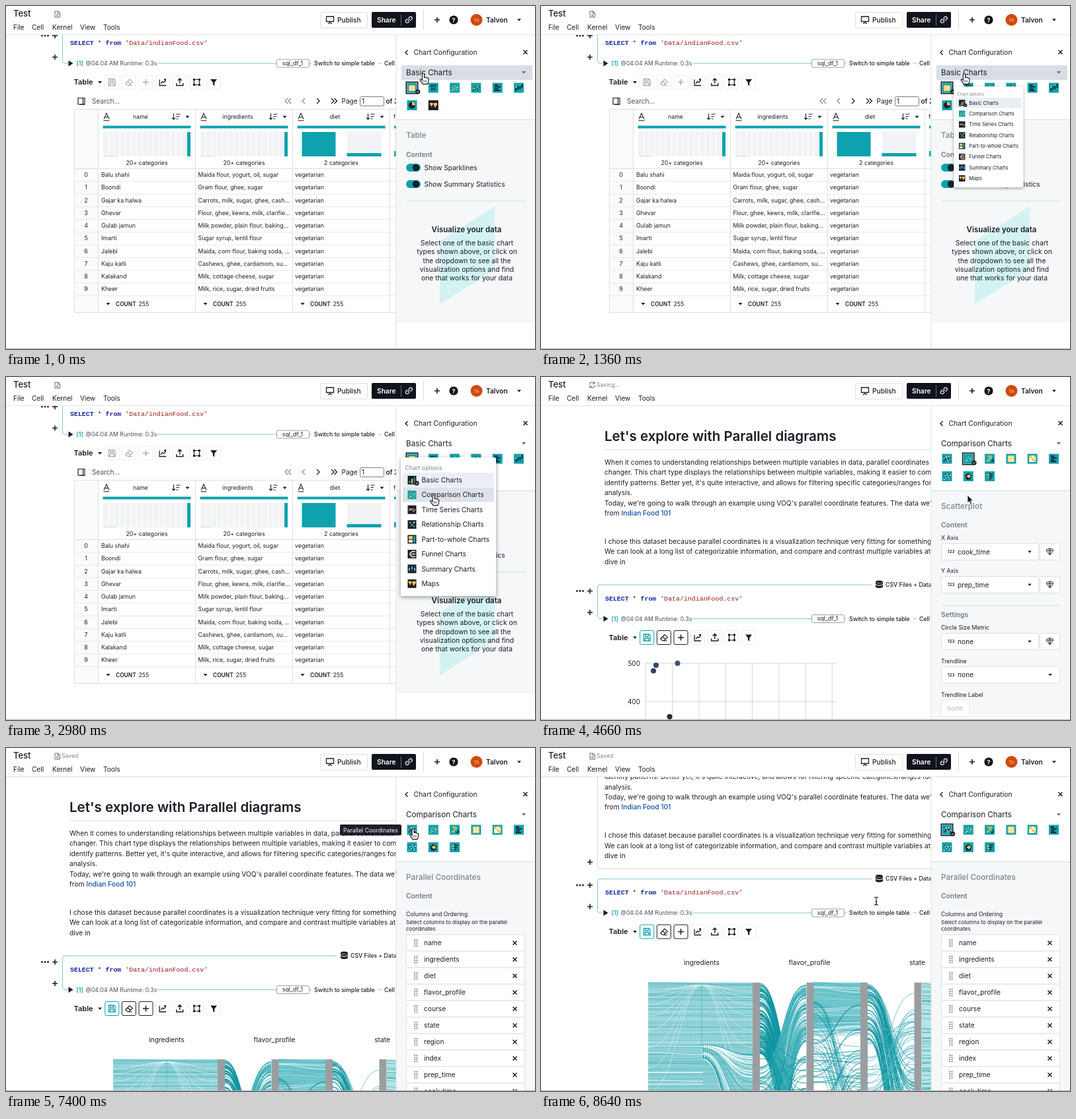
Animation, 800 px wide and 520 px high, one loop 8.66 s. Source, as an HTML page:

```html
<!DOCTYPE html>
<html lang="en">
<head>
<meta charset="utf-8">
<title>Notebook chart configuration</title>
<style>
html, body { margin: 0; width: 100%; height: 100%; overflow: hidden; background: #fff; }
svg { display: block; font-family: Inter, "Liberation Sans", sans-serif; }
.mono { font-family: "Liberation Mono", "DejaVu Sans Mono", monospace; }
</style>
</head>
<body>
<svg id="stage" width="800" height="520" viewBox="0 0 800 520"></svg>
<script>
const LOOP = 8660, TABLE_SCROLL = 279.5;
const INK = '#1b1e29', TEAL = '#0ea2ae', YELLOW = '#f8c54a', GREY = '#7d858d', LINE = '#dcdfe2';

// Markup helpers; text is placed by its vertical centre
const R = (x, y, w, h, fill, more = '') =>
  `<rect x="${x}" y="${y}" width="${w}" height="${h}" fill="${fill}" ${more}/>`;
const P = (d, stroke = INK, w = 1, fill = 'none', more = '') =>
  `<path d="${d}" stroke="${stroke}" stroke-width="${w}" fill="${fill}" ${more}/>`;
const F = (d, fill = INK) => P(d, 'none', 0, fill);
const C = (x, y, r, fill) => `<circle cx="${x}" cy="${y}" r="${r}" fill="${fill}"/>`;
const T = (x, cy, s, size = 8.8, weight = 400, fill = INK, more = '') =>
  `<text x="${x}" y="${(cy + size * .36).toFixed(2)}" font-size="${size}" font-weight="${weight}" fill="${fill}" ${more}>${s}</text>`;
const MID = 'text-anchor="middle"';
const G = (id, s, more = '') => `<g id="${id}" ${more}>${s}</g>`;
const at = (x, y, s) => `<g transform="translate(${x} ${y})">${s}</g>`;
const list = (n, fn) => Array.from({ length: n }, (_, i) => fn(i)).join('');
const box = (x, y, w, h, stroke = LINE, fill = '#fff') =>
  R(x + .5, y + .5, w - 1, h - 1, fill, `rx="2" stroke="${stroke}"`);
const caret = (x, y, s = 3, fill = INK) => F(`M${x - s} ${y - s / 2}h${2 * s}l${-s} ${s * 1.15}z`, fill);
const plus = (x, y, s = 4, col = INK) => P(`M${x - s} ${y}h${2 * s}M${x} ${y - s}v${2 * s}`, col, 1.6);
const cross = (x, y) => P(`M${x - 3} ${y - 3}l6 6m0-6l-6 6`, INK, 1.5);
const check = (x, y) => C(x, y, 3.6, INK) + P(`M${x - 1.6} ${y}l1.2 1.3 2-2.5`, '#fff', .9);

let seed = 7;
const rand = () => (seed = seed * 16807 % 2147483647) / 2147483647;

// Small chart icons, centred on 0,0
const dots = col => list(7, i => R(-5 + i * 1.5, 3.5 - (i * 5 % 8), 1.5, 1.5, col));
const glyphs = {
  table: R(-5, -4, 10, 9, YELLOW) + P('M-5-1h10M-5 2h10M-1.5-4v9M2-4v9', '#fff', .8),
  word: T(0, -2.5, 'WO', 5, 700, INK, MID) + T(0, 2.6, 'RD', 5, 700, INK, MID),
  scatter: dots(YELLOW) + R(-3, 2, 1.3, 1.3, '#fff') + R(3, -1, 1.3, 1.3, '#fff'),
  bubble: dots(INK) + C(2, -2, 1.3, YELLOW) + C(-3, 1, 1.2, YELLOW),
  bars: P('M-4.5-4h5M-4.5-1.3h9M-4.5 1.3h6M-4.5 4h8', INK, 1.8),
  candles: P('M-4 0v5M-1-2v5M2-4v6M5-6v6', INK, 1.8) + P('M-4-2v2M2-5v2', '#fff', .8),
  pie: C(0, 0, 5, INK) + F('M0 0V-5A5 5 0 0 1 5 0z', YELLOW),
  map: F('M-6-3l4-1 2 2-2 2 0 3-2-3zM0-3l5-1 1 3-2 2-1 3-2-3z', YELLOW),
  parallel: P('M-5-4L0 3 5-3M-5 4L0-2 5 4', INK, 1.1) + P('M-5 0L-1-4 1 4 5 0', '#fff', .8) + C(3, -3, 1.2, YELLOW),
  bump: P('M-4-4h6v3h-3v4h-4', YELLOW, 1.7) + P('M2 4h3v-4', INK, 1.4),
  heat: R(-5, -5, 10, 10, YELLOW) + P('M-5-2h10M-5 2h10M-2-5v10M2-5v10', '#fff', 1.2),
  matrix: R(-5, -5, 10, 10, '#fff') + F('M-5-5h4v4h4v4h-4v-4h-4zM2-5h3v3h-3zM2 2h3v3h-3z', YELLOW),
  strip: P('M-5-3h10M-5 0h10M-5 3h10', INK, .7) + dots('#fff'),
  radar: F('M0-5L5-1 3 5-3 5-5-1z') + F('M-3 0L1-3 4 0 1 3z', YELLOW),
  tornado: P('M0-5v10', INK, 1.4) + P('M0-3h5M0 0h4M0 3h3', INK, 1.6) + P('M0-2h-4M0 2h-3', YELLOW, 1.6),
  columns: P('M-3.5 5v-4M3.5 5v-9', TEAL, 2) + P('M0 5v-7', YELLOW, 2),
  trend: P('M-5-2l3 3 3-3 4 3', YELLOW, 1) + P('M-5 2l3-4 4 5 3-3', '#fff', .8),
  links: P('M-4-3L3 3M-3 4L4-4', '#fff', .6) + C(-3, -3, 1.5, TEAL) + C(3, 3, 1.5, TEAL) + C(3, -3, 1.3, YELLOW),
  parts: R(-5, -5, 6, 5, YELLOW) + R(2, -5, 3, 10, TEAL) + R(-5, 1, 6, 4, '#fff'),
  funnel: P('M5-4h-5l-3 3v2l3 3h5', '#fff', 1.5) + P('M5 0h-6', YELLOW, 2),
  boxes: P('M-4-4v8M0-5v9M4-4v8', TEAL, 1) + P('M-4-1v3M0-3v3M4-1v3', '#7fc4ff', 2)
};
const icon = (x, y, kind, bg = TEAL, s = 15) =>
  at(x, y, R(-s / 2, -s / 2, s, s, bg) + glyphs[kind]);
const slot = i => [614 + i % 6 * 32.3, 124 + Math.floor(i / 6) * 26.5];
const iconSet = kinds => kinds.map((k, i) => icon(...slot(i), k, k === 'map' ? INK : TEAL)).join('');
const chosen = i => {
  const [x, y] = slot(i);
  return R(x - 8.7, y - 8.7, 17.4, 17.4, 'none', `stroke="${INK}" stroke-width="1.6"`) + check(x + 8.7, y + 6);
};

// Page header
const docIcon = P('M74 8h5l2.5 2.5V17H74zM76 13h3.5M76 15h3.5M78.5 8v3h3', '#555b63', .9);
const header = R(0, 0, 800, 44, '#fff') + R(0, 43, 800, 1, '#e2e4e6') +
  T(11, 11.5, 'Test', 13, 500) +
  [[11, 'File'], [39, 'Cell'], [70, 'Kernel'], [112, 'View'], [147, 'Tools']].map(([x, s]) => T(x, 32, s, 10.1)).join('') +
  G('doc', docIcon) +
  G('sync', P('M73 12a4.5 4.5 0 0 1 8-2.5m0-2.5v3h-3M82 12a4.5 4.5 0 0 1-8 2.5m0 2.5v-3h3', '#555b63', 1) + T(84, 12, 'Saving...', 8.7, 400, GREY)) +
  G('saved', T(84, 12, 'Saved', 8.7, 400, GREY)) +
  box(475, 9, 72, 25) +
  P('M484.5 16h11v7.5h-11zM490 23v3M487 27l3-2 3 2', INK, 1.3) + T(501, 21.5, 'Publish', 10.2, 500) +
  R(553, 9, 67, 24, '#11131d', 'rx="2"') + T(561, 21.5, 'Share', 10.2, 600, '#fff') + R(597, 13, 1, 17, '#6a6d78') +
  P('M607.5 22.5l3-3m-3.5 0l-2 2a2.3 2.3 0 0 0 3.3 3.3l2-2m-2-4l2-2a2.3 2.3 0 0 1 3.3 3.3l-2 2', '#fff', 1.2) +
  R(631, 6, 1, 30, '#d5d8db') + plus(652, 21) +
  C(677, 21, 6.6, '#11131d') + T(677, 21.2, '?', 9.5, 700, '#fff', MID) +
  C(711.5, 21, 9, '#cf4a0a') + T(711.5, 21.2, 'TA', 6.8, 400, '#f6c9a8', MID) +
  T(726, 21.5, 'Talvon', 10.2, 600) + caret(776, 21);

// Notebook text and query cell
const story = [
  [129.5, 'When it comes to understanding relationships between multiple variables in data, parallel coordinates are a game'],
  [144.8, 'changer. This chart type displays the relationships between multiple variables, making it easier to compare and'],
  [160.2, "identify patterns. Better yet, it's quite interactive, and allows for filtering specific categories/ranges for"],
  [175.5, 'analysis.'],
  [191, "Today, we're going to walk through an example using VOQ's parallel coordinate features. The data we're using is"],
  [206.3, 'from <tspan font-weight="500" fill="#0b4fa8">Indian Food 101</tspan>'],
  [249, 'I chose this dataset because parallel coordinates is a visualization technique very fitting for something like this.'],
  [264.5, 'We can look at a long list of categorizable information, and compare and contrast multiple variables at once.'],
  [280, 'dive in']
].map(([y, s]) => T(96, y, s, 10.26)).join('');

const EDGE = '#86c8d0';
const query = [53.5, 58, 62.5].map(x => C(x + 1, 324.5, 1.4, INK)).join('') + plus(74, 324.5) + plus(74, 357) +
  P('M500 315H89q-3.5 0-3.5 3.5V362q0 4.5 4.5 4.5h4', EDGE) +
  `<g fill="${INK}"><ellipse cx="511.5" cy="310.5" rx="5.5" ry="2"/><path d="M506 311.5q5.5 3 11 0v2.5q-5.5 3-11 0zM506 315q5.5 3 11 0v3.5q-5.5 3-11 0z"/></g>` +
  T(521, 314.5, 'CSV Files + Databases', 8.75, 500) +
  T(97, 335, `<tspan font-weight="700" fill="#10259e">SELECT</tspan> * <tspan font-weight="700" fill="#10259e">from</tspan> <tspan fill="#a01616">'Data/indianFood.csv'</tspan>`, 9.92, 400, INK, 'class="mono"') +
  F('M94.5 362v9l7-4.5z') + T(106.5, 366.5, '[1]', 8.7, 600, TEAL) +
  T(120.5, 366.5, '@04:04 AM Runtime: 0.3s', 8.7, 400, '#4a4e57') +
  P('M229 366.5h180M458 366.5h4M563 366.5h5', EDGE) + box(409, 360, 50, 13, '#9aa0a8') +
  T(433.5, 366.3, 'sql_df_1', 8.8, 400, INK, MID) + T(466, 366.5, 'Switch to simple table', 8.75, 500) + T(572, 366.5, 'Cell', 8.75, 500);

// Result toolbar
const tool = [
  c => P('M-5-5h8l2 2v8h-10zM-2.5-5v3.5h4.5v-3.5M-3 5v-4h6v4', c, 1.3),
  c => P('M-5 2l6-6.5 4.5 4-5 5h-3zM-2-1.5l4 4M-1 5h6', c, 1.2),
  c => P('M-4.5 0h9M0-4.5v9', c, 1.5),
  c => P('M-5-4v9h10M-3 2l2.5-3 2 1.5 3-3', c, 1.3) + C(3.5, -4, 1.6, c),
  c => P('M-5 1.5V5h10V1.5M0 2v-7M-3-2.5l3-3 3 3', c, 1.4),
  c => P('M-4-4h8v8h-8z', c, 1.2) + F('M-5.5-5.5h3v3h-3zM2.5-5.5h3v3h-3zM-5.5 2.5h3v3h-3zM2.5 2.5h3v3h-3z', c),
  c => F('M-5-4.5h10l-3.8 5v5l-2.4-1.5v-3.5z', c)
];
const toolX = i => 160.2 + i * 25.65;
const tools = live => tool.map((draw, i) => {
  const edge = i < 3 && live ? (i ? INK : TEAL) : '#eceef0';
  const col = i > 2 ? INK : live ? (i ? INK : TEAL) : '#a9aeb4';
  return box(toolX(i) - 11, 384, 22, 22, edge) + at(toolX(i), 395, draw(col));
}).join('');
const toolLabel = T(102.5, 395, 'Table', 11, 600) + caret(142, 395);

// Data table, laid out as seen at its scroll position
const rows = [
  ['Balu shahi', 'Maida flour, yogurt, oil, sugar'], ['Boondi', 'Gram flour, ghee, sugar'],
  ['Gajar ka halwa', 'Carrots, milk, sugar, ghee, cash...'], ['Ghevar', 'Flour, ghee, kewra, milk, clarifie...'],
  ['Gulab jamun', 'Milk powder, plain flour, baking...'], ['Imarti', 'Sugar syrup, lentil flour'],
  ['Jalebi', 'Maida, corn flour, baking soda, ...'], ['Kaju katli', 'Cashews, ghee, cardamom, su...'],
  ['Kalakand', 'Milk, cottage cheese, sugar'], ['Kheer', 'Milk, rice, sugar, dried fruits']];
const STEP = 19.28;
const column = (name, i) => {
  const x = 139.5 + i * 147;
  const spark = i < 2
    ? list(15, k => R(x + 7.5 + k * 8.5, 191, 7.3, 37, '#f2f3f4')) + R(x + 134.5, 191, 5, 37, TEAL) + R(x + 8, 227, 18, 1, '#bfe3e6')
    : R(x + 14, 191, 51, 37, TEAL) + R(x + 82, 191, 52, 37, '#f2f3f4') + R(x + 82, 223, 52, 5, TEAL);
  return P(`M${x} 156v308`, LINE) + P(`M${x + 8.5} 171.5l4-9 4 9m-1.5-3h-5M${x + 8} 173.8h9`, INK, 1.1) +
    T(x + 64, 168, name, 8.8, 400, INK, MID) +
    P(`M${x + 114} 163v9m-2.5-2.5l2.5 2.5 2.5-2.5M${x + 118} 164h6M${x + 118} 167.5h4.5M${x + 118} 171h3`, INK, 1.1) +
    caret(x + 135, 168) + R(x + 7, 181.5, 133, 4, TEAL) + spark +
    T(x + 73.5, 237.5, i < 2 ? '20+ categories' : '2 categories', 8.8, 400, INK, MID) +
    caret(x + 15, 451.5) + T(x + 26.5, 451.5, 'COUNT', 8.4, 600) + T(x + 61, 451.5, '255', 8.8);
};
const table = P('M109 139.5h10v9.5h-10zM111 149.5h8M116.5 139.5v10', INK, 1.2) + T(130, 144.5, 'Search...', 10.1, 400, '#4a4e57') +
  P('M426 140l-4 4 4 4M431 140l-4 4 4 4M452 140l-4 4 4 4', '#7a8089', 1.1) +
  P('M470 140l4 4-4 4M492 140l4 4-4 4M496.5 140l4 4-4 4', INK, 1.3) +
  T(507.5, 144.5, 'Page', 10) + box(535, 137, 37, 15, '#777d86') + T(538, 144.5, '1', 10) + T(574.5, 144.5, 'of 26', 10, 600) +
  R(103, 156, 36, 308, '#fafbfb') + P('M103.5 464V156.5H590M103 246.5H590M103 464.5H590', LINE) +
  ['name', 'ingredients', 'diet'].map(column).join('') +
  P('M580.5 156v308', LINE) + T(586, 168, 'f', 8.8) + R(587, 181.5, 10, 4, TEAL) + R(587, 191, 4, 37, '#f2f3f4') + R(587, 220, 4, 8, TEAL) +
  rows.map(([name, parts], i) => {
    const y = 255.8 + i * STEP;
    return T(121, y, i, 8.8, 400, INK, MID) + T(144, y, name) + T(290.5, y, parts) + T(437, y, 'vegetarian') +
      P(`M103 ${(246.5 + (i + 1) * STEP).toFixed(1)}H590`, '#e6e8ea');
  }).join('');

// Scatter plot
const scatter = P(list(8, i => `M${158.5 + i * 40.25} 434v120`) + 'M158 434H447M158 492H447', '#d3d5d8') +
  T(150, 434, '500', 10, 400, INK, 'text-anchor="end"') + T(150, 492, '400', 10, 400, INK, 'text-anchor="end"') +
  C(174, 437, 4, '#34466a') + C(170, 445.5, 4, '#35435c') + C(206.5, 434, 4, '#3f5470') + C(194.5, 515, 4, '#232a3c');

// Parallel coordinates: bundles of curves between two vertical spans
const bundle = (n, x1, x2, [a, b], [c, d], mix, col, w, more) => P(list(n, () => {
  const r = rand(), q = r * (1 - mix) + rand() * mix, m = (x1 + x2) / 2;
  const y1 = (a + r * (b - a)).toFixed(1), y2 = (c + q * (d - c)).toFixed(1);
  return `M${x1} ${y1}C${m} ${y1} ${m} ${y2} ${x2} ${y2}`;
}), col, w, 'none', more);
const PALE = '#7fcbd1', DEEP = '#0f95a1', DASH = 'stroke-dasharray="2 1"';
const parallel = R(162, 472, 158, 340, '#8dd0d5') +
  bundle(120, 162, 320, [472, 800], [472, 800], .01, '#5bbcc4', .7) +
  bundle(30, 162, 320, [480, 566], [480, 566], .02, '#d8eff1', .7, DASH) +
  bundle(36, 162, 245, [568, 800], [568, 800], .02, '#f0fafa', 1) +
  P(list(9, i => { const y = 484 + i * i * 2.4; return `M162 ${y}C204 ${y} 212 476 243 476S274 ${y} 320 ${y}`; }), '#e3f4f6', .9, 'none', DASH) +
  P('M243 474v94', '#3aa9b2', .8, 'none', DASH) +
  bundle(24, 245, 320, [566, 590], [572, 800], .05, '#f2fbfb', 1.5) +
  bundle(24, 245, 320, [566, 590], [572, 800], .05, DEEP, .7, DASH) +
  bundle(110, 331, 401, [472, 580], [640, 900], .2, DEEP, 1) +
  bundle(90, 331, 401, [600, 900], [472, 570], .15, '#3fb0ba', 1) +
  bundle(50, 331, 401, [560, 800], [580, 840], 1, DEEP, .9) +
  R(412, 472, 71, 72, PALE) + bundle(60, 412, 483, [472, 556], [472, 556], .1, '#5bbcc4', .8) +
  bundle(14, 412, 483, [475, 556], [475, 556], .1, '#e4f5f6', .8) +
  bundle(40, 412, 483, [550, 830], [550, 800], .1, '#57bac2', .8) +
  bundle(45, 412, 483, [560, 860], [490, 760], .4, DEEP, .9) +
  bundle(30, 412, 483, [500, 600], [590, 800], .4, DEEP, .8, DASH) +
  bundle(60, 494, 565, [472, 560], [570, 900], .3, DEEP, .9) +
  bundle(40, 494, 565, [580, 900], [474, 700], .4, '#2ba6b0', .9, DASH) +
  bundle(30, 494, 565, [540, 800], [500, 700], .5, '#57bac2', .8) +
  R(576, 472, 20, 200, '#b9e2e5') + bundle(60, 576, 620, [472, 660], [472, 660], .06, '#45b2bb', .8) +
  [320, 401.5, 483, 564.5].map(x => R(x, 472, 11, 340, '#9b9ea1')).join('') +
  T(243, 442, 'ingredients', 10.2, 400, INK, MID) + T(406, 442, 'flavor_profile', 10.2, 400, INK, MID) + T(569, 442, 'state', 10.2, 400, INK, MID);

const page = G('page',
  T(96, 90, "Let's explore with Parallel diagrams", 20.5, 600) + R(96, 110, 520, 1, LINE) + story +
  G('textCell', P('M85.5 60V296q0 3.5 3.5 3.5H600', '#d3d6da') + plus(74, 289.5)) +
  query + toolLabel + G('idleTools', tools(false)) + G('liveTools', tools(true)) +
  G('table', table, `transform="translate(0 ${TABLE_SCROLL})"`) + G('scatter', scatter) + G('parallel', parallel));

// Side panel
const title = s => T(605, 195.5, s, 11.8, 500, GREY);
const head = (y, s) => T(605, y, s, 10.3, 600, '#727a83');
const toggle = (y, s) => R(605, y - 6, 22, 12, TEAL, 'rx="6"') + C(620, y, 5.3, INK) + T(632.5, y, s, 10.2);
const select = (y, label, value, gem = true) => T(605, y - 21, label, 8.8) +
  box(605, y - 13, gem ? 148 : 180, 26) + T(615, y, '123', 6.3, 600) + T(630, y, value, 10.2) + caret(gem ? 739 : 770, y, 2.8) +
  (gem ? box(754, y - 13, 31, 26) + P(`M764 ${y - 2}l2.5-3h6l2.5 3-5.5 7zM764 ${y - 2}h11m-7 0l1.5 7 1.5-7-1.5-3z`, INK, .9) : '');
const fields = ['name', 'ingredients', 'diet', 'flavor_profile', 'course', 'state', 'region', 'index', 'prep_time', 'cook_time'];
const blurb = ['Select one of the basic chart', 'types shown above, or click on', 'the dropdown to see all the', 'visualization options and find', 'one that works for your data'];

const tablePanel = R(591, 480, 209, 40, '#fff') + title('Table') + head(225, 'Content') +
  toggle(245, 'Show Sparklines') + toggle(270, 'Show Summary Statistics') + R(605, 295, 180, 1, '#cfe6e8') +
  F('M739 304v96l-83 52v-95z', '#d3f3f2') + T(696.5, 339, 'Visualize your data', 11.5, 600, INK, MID) +
  blurb.map((s, i) => T(697, 359.5 + i * 13.2, s, 10.35, 400, INK, MID)).join('');
const scatterPanel = title('Scatterplot') + head(224.5, 'Content') +
  select(265, 'X Axis', 'cook_time') + select(315, 'Y Axis', 'prep_time') + R(605, 346, 180, 1, '#cfe6e8') +
  head(360.5, 'Settings') + select(401, 'Circle Size Metric', 'none') + select(451.5, 'Trendline', 'none', false) +
  T(605, 481.5, 'Trendline Label', 8.8) + box(605, 489, 43, 26, '#e8eaec') + T(614, 502, 'none', 10.2, 400, '#b4b9be');
const parallelPanel = title('Parallel Coordinates') + head(224.5, 'Content') + T(605, 251.5, 'Columns and Ordering', 8.75) +
  T(605, 264.5, 'Select columns to display on the parallel', 8.05) + T(605, 274.5, 'coordinates', 8.05) +
  fields.map((s, i) => {
    const y = 295.5 + i * 25;
    return box(605, y - 13, 180, 26) + list(8, k => R(617.5 + k % 2 * 3.2, y - 5.5 + (k >> 1) * 3.2, 1.6, 1.6, '#555b63')) +
      T(632, y, s, 10.2) + cross(769.5, y);
  }).join('');

const panel = R(590, 44, 210, 476, '#fff') + R(590, 172, 210, 348, '#f5f7f8') + R(590, 172, 210, 1, '#d9dcdf') +
  G('tablePanel', tablePanel) + G('scatterPanel', scatterPanel) + G('parallelPanel', parallelPanel) +
  R(589.5, 44, 1, 476, '#dfe2e4') +
  P('M607.5 67l-3.5 3.5 3.5 3.5', INK, 1.4) + T(616.5, 70.5, 'Chart Configuration', 10.3) + cross(785.5, 70) +
  G('trigger', R(598, 90, 198, 22, '#d8dee4')) + caret(783, 100.5, 3, '#5b6570') +
  G('basic', T(605, 100.5, 'Basic Charts', 11.7) + iconSet(['table', 'word', 'scatter', 'bubble', 'bars', 'candles', 'pie', 'map']) + chosen(0)) +
  G('compare', T(605, 100.5, 'Comparison Charts', 11.7) + iconSet(['parallel', 'scatter', 'bump', 'heat', 'matrix', 'bars', 'strip', 'radar', 'tornado'])) +
  G('pickScatter', chosen(1)) + G('pickParallel', chosen(0));

// Dropdown menu
const ITEM = 22.43;
const options = [['Basic Charts', 'columns'], ['Comparison Charts', 'scatter'], ['Time Series Charts', 'trend'], ['Relationship Charts', 'links'],
  ['Part-to-whole Charts', 'parts'], ['Funnel Charts', 'funnel'], ['Summary Charts', 'boxes'], ['Maps', 'map']];
const menu = G('menu', `<g filter="url(#shadow)">${R(597, 122, 144, 210, '#fff', 'rx="2.5"')}${F('M689 123l8-8 8 8z', '#fff')}</g>` +
  T(603.5, 137.5, 'Chart options', 8.8, 400, GREY) + R(600, 145, 138, 22, '#eceef5') + G('hover', R(600, 145, 138, 22, '#dde3e8')) +
  options.map(([s, k], i) => icon(614, 156.3 + i * ITEM, k, i === 1 ? TEAL : INK, 13) + T(628.5, 156.3 + i * ITEM, s, 10.3)).join('') + check(621, 161));

const tip = G('tip', R(505, 116, 93, 16.5, '#1b1d29', 'rx="2"') + T(510, 124.5, 'Parallel Coordinates', 8.75, 400, '#fff'));
const cursors = G('cursor',
  G('hand', P('M-1.5 1.5a1.5 1.5 0 0 1 3 0v5l1-.5 1.5.8 1.2-.2 1.3 1 1.5.3v4l-1.5 4.5h-7l-4-5.5c-1-1.7.8-2.5 2-1.2l1 1z', '#111', 1.1, '#fff') + P('M.5 10.5v3M2.5 10.5v3M4.5 10.5v3', '#111', .7)) +
  G('arrow', P('M0 0v12l2.7-2.4 2 4.6 2-.9-2-4.5h3.8z', '#fff', .8, '#111')) +
  G('beam', P('M-3-6q3 0 3 2v8q0 2-3 2M3-6q-3 0-3 2v8q0 2 3 2M-1.5 1h3', '#222', 1.2)));

document.getElementById('stage').innerHTML =
  `<defs><clipPath id="view"><rect x="0" y="44" width="590" height="476"/></clipPath>
  <filter id="shadow" x="-20%" y="-20%" width="140%" height="140%"><feDropShadow dx="0" dy="2" stdDeviation="3" flood-color="#10161a" flood-opacity=".4"/></filter></defs>` +
  R(0, 0, 800, 520, '#fff') + `<g clip-path="url(#view)">${page}</g>` + panel + header + menu + tip +
  R(0, 519, 800, 1, '#b3b5b8') + cursors;

// Motion
const el = id => document.getElementById(id);
const show = (id, on) => el(id).style.display = on ? '' : 'none';
const move = (id, x, y) => el(id).setAttribute('transform', `translate(${x.toFixed(2)} ${y.toFixed(2)})`);
const ramp = (t, a, b) => Math.min(1, Math.max(0, (t - a) / (b - a)));
const ease = p => p * p * (3 - 2 * p);

const track = [[0, 631, 102], [700, 631, 102], [1250, 640, 102], [1950, 640, 102], [2700, 647, 178], [3700, 645, 179],
  [4750, 645, 179], [5450, 611, 127], [6100, 611, 127], [6450, 615.5, 122], [7650, 615.5, 122], [8080, 507, 232], [LOOP, 507, 232]];
function pointer(t) {
  const i = track.findIndex(k => k[0] > t), [t0, x0, y0] = track[i - 1], [t1, x1, y1] = track[i];
  const p = ease(ramp(t, t0, t1));
  return [x0 + (x1 - x0) * p, y0 + (y1 - y0) * p];
}

function draw(t) {
  const [x, y] = pointer(t);
  const compare = t >= 3640, plotted = t >= 3900, picked = t >= 6500, lines = t >= 6800, saved = t >= 7060;

  move('page', 0, plotted ? -116.5 * ease(ramp(t, 8060, 8600)) : -TABLE_SCROLL);
  show('table', !plotted);
  show('scatter', plotted && !lines);
  show('parallel', lines);
  show('idleTools', !plotted);
  show('liveTools', plotted);
  show('textCell', t >= 7900);

  show('doc', !plotted || saved);
  show('sync', plotted && !saved);
  show('saved', saved);

  show('tablePanel', !compare);
  show('scatterPanel', compare && !picked);
  show('parallelPanel', picked);
  show('basic', !compare);
  show('compare', compare);
  show('pickScatter', compare && !picked);
  show('pickParallel', t >= 7600);
  show('trigger', t < 3000 && y < 112);

  const closing = ramp(t, 3600, 3700), scale = .4 + .6 * ramp(t, 1290, 1420) - .3 * closing;
  show('menu', t >= 1290 && t < 3700);
  el('menu').setAttribute('transform', `translate(697.5 122) scale(${scale.toFixed(3)}) translate(-697.5 -122)`);
  el('menu').setAttribute('opacity', 1 - closing);
  const row = Math.floor((y + 1 - 145) / ITEM);
  show('hover', row >= 0);
  move('hover', 0, Math.max(0, row) * ITEM);

  el('tip').setAttribute('opacity', .85 * ramp(t, 5660, 5760) + .15 * ramp(t, 5760, 5800) - ramp(t, 7720, 7820));

  const hand = t < 3620 || (t >= 5350 && t < 7720), beam = t >= 7840;
  move('cursor', x, y);
  show('hand', hand);
  show('arrow', !hand && !beam);
  show('beam', beam);
}

function tick() {
  draw(performance.now() % LOOP);
  requestAnimationFrame(tick);
}
tick();
</script>
</body>
</html>
```
